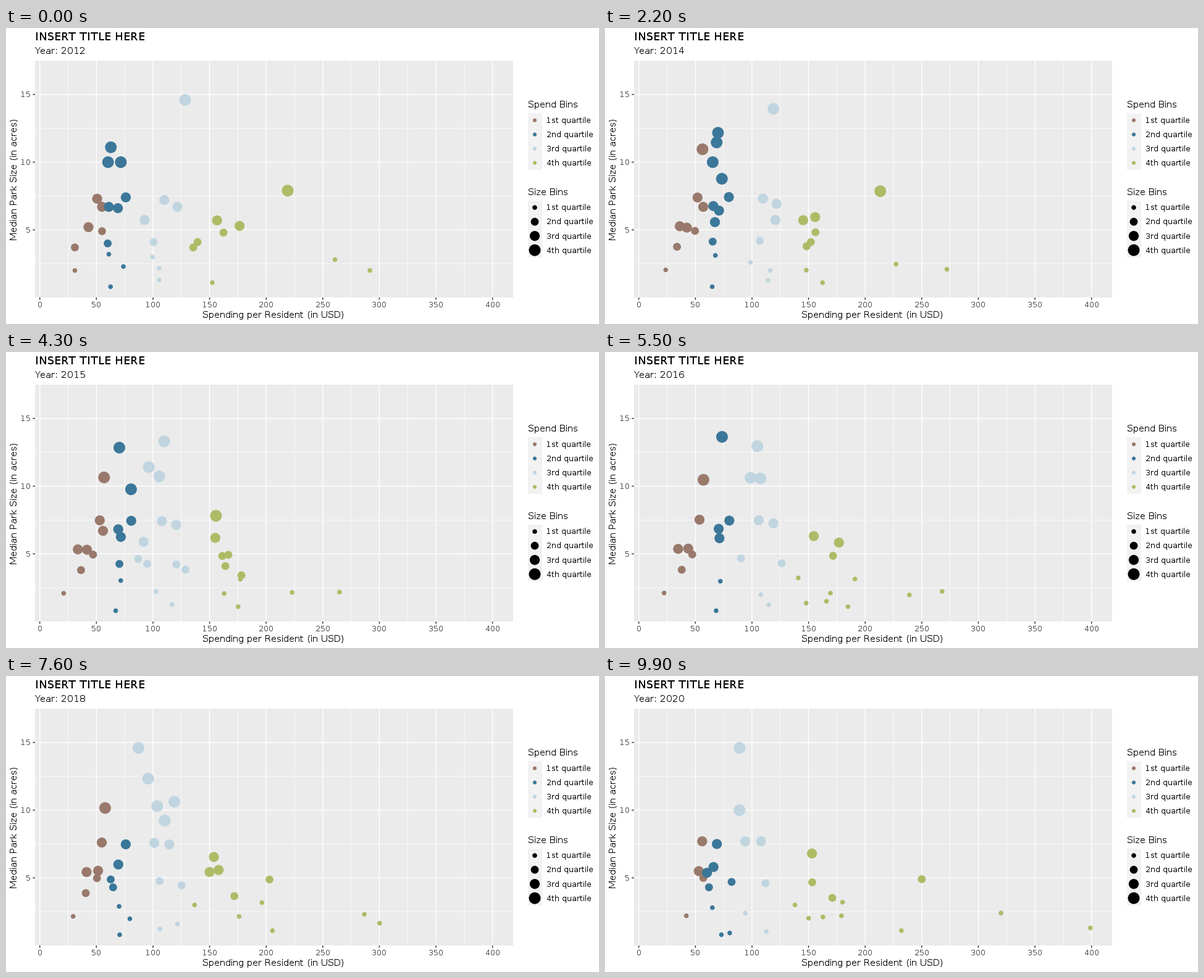
These frames come from a looping animation (960x480 px, 10 s). A matplotlib script:

```python
import math
import numpy as np
import matplotlib.pyplot as plt
from matplotlib.animation import FuncAnimation
from matplotlib.patches import Rectangle

# whole-pixel glyph advances
plt.rcParams.update({"font.family": "DejaVu Sans",
                     "text.hinting": "default", "text.hinting_factor": 1})

W, H, DPI = 960, 480, 96
FRAMES, INTERVAL = 100, 100
LAST_YEAR = 8
LEFT, RIGHT, TOP, BOTTOM = 47, 821, 53, 437
X_MIN, X_MAX, Y_MIN, Y_MAX = -4.2, 418.2, 0.005, 17.495

COLORS = ["#99796b", "#3b7799", "#c0d5e0", "#aebb66"]
QUARTILES = ["1st quartile", "2nd quartile", "3rd quartile", "4th quartile"]
SPEND_CUTS = [56.5, 85, 131.5]
SIZE_CUTS = [3.25, 5.05, 7.75]
LAYERS = [3, 2, 0, 1]


def px(x):
    return LEFT + (x - X_MIN) * (RIGHT - LEFT) / (X_MAX - X_MIN)


def py(y):
    return BOTTOM - (y - Y_MIN) * (BOTTOM - TOP) / (Y_MAX - Y_MIN)


def dot_radius(size):
    """Point size in mm to pixels, outline included."""
    return size * 72.27 / 25.4 * 0.5 + 0.945


def area(radius):
    return (2 * np.asarray(radius) * 72 / DPI) ** 2


# areas grow evenly from size 2 to size 6
RADII = [dot_radius(math.sqrt(a)) for a in np.linspace(4, 36, 4)]


class Dot:
    """Glides between two points; bow bends the way sideways."""

    def __init__(self, start, end, bow=0, years=(0, LAST_YEAR)):
        self.start, self.end = np.array(start, float), np.array(end, float)
        self.bow = bow
        self.born, self.gone = (round((FRAMES - 1) * k / LAST_YEAR) for k in years)
        self.spend = np.digitize(start[0], SPEND_CUTS)
        self.size = np.digitize(start[1], SIZE_CUTS)

    def at(self, i):
        u = (i - self.born) / max(1, self.gone - self.born)
        x, y = self.start + (self.end - self.start) * u
        return px(x + self.bow * math.sin(math.pi * u)), py(y)


dots = [
    # lowest spending
    Dot((31, 2), (42, 2.2), -15),
    Dot((55, 4.9), (57, 5), -9),
    Dot((43, 5.2), (53, 5.5), -14),
    Dot((50.7, 7.3), (56, 7.7)),
    Dot((31, 3.7), (42, 3.9), years=(0, 7)),
    Dot((55, 6.7), (55, 6.7), 2, (0, 4)),
    Dot((44, 5.1), (57, 5.6), -8, (1, 7)),
    Dot((56, 11.1), (58, 10), years=(1, 7)),
    # second quartile
    Dot((61, 3.2), (65, 2.8), 9),
    Dot((62.5, 0.8), (73, 0.8)),
    Dot((69, 6.6), (66, 5.8), 4),
    Dot((76, 7.4), (69, 7.5), 8),
    Dot((60, 4), (72, 4.3), years=(0, 4)),
    Dot((61, 6.7), (72, 6.9), 2, (0, 6)),
    Dot((60.3, 10), (66, 10), years=(0, 2)),
    Dot((71.6, 10), (81, 14.9), -7, (0, 6)),
    Dot((62.8, 11.1), (62, 12.9), 8, (0, 3)),
    Dot((70, 8.3), (83, 10.1), years=(1, 4)),
    Dot((65, 4.3), (62, 4.3), years=(6, 8)),
    Dot((61, 4.9), (82, 4.7), years=(6, 8)),
    # third quartile
    Dot((110, 7.2), (94, 7.7), 5),
    Dot((121.5, 6.7), (108, 7.7), 5),
    Dot((99.5, 3), (130, 1.4), -12, (0, 7)),
    Dot((105.6, 1.3), (100, 1.2), 14, (0, 7)),
    Dot((128.4, 14.6), (91, 12), years=(0, 7)),
    Dot((100.6, 4.1), (88, 4.3), 12, (0, 4)),
    Dot((107, 4.1), (112, 4.6), 18, (2, 8)),
    Dot((86, 4.6), (118, 4.8), -8, (3, 7)),
    Dot((97, 12.6), (119, 8.5), -9, (2, 7)),
    Dot((104, 10.8), (89, 10), 10, (3, 8)),
    Dot((110, 9.5), (126, 11.5), years=(5, 7)),
    Dot((87, 14.6), (89, 14.6), years=(6, 8)),
    # highest spending
    Dot((291.6, 2), (320, 2.4), -40),
    Dot((260.8, 2.8), (399, 1.3), -100),
    Dot((152.4, 1.1), (232, 1.1), -12),
    Dot((162.3, 4.8), (250, 4.9), -40),
    Dot((156.6, 5.7), (153, 6.8)),
    Dot((140, 2), (179, 2.2), 10, (1, 8)),
    Dot((147, 3.1), (180, 3.2), 32, (2, 8)),
    Dot((136, 3), (138, 3), years=(5, 8)),
    Dot((135.6, 3.7), (150, 3.8), years=(0, 2)),
    Dot((139.4, 4.1), (168, 4.1), years=(0, 4)),
    Dot((219, 7.9), (128, 7.8), 35, (0, 4)),
]

# a few dots stay for one year only
rng = np.random.default_rng(12)
for k in range(LAST_YEAR + 1):
    for _ in range(4):
        spot = np.array([rng.uniform(60, 190), rng.uniform(1, 6)])
        dots.append(Dot(spot, spot + rng.normal(0, (5, 0.2)),
                        years=(k, min(k + 1, LAST_YEAR))))

dots.sort(key=lambda d: LAYERS.index(d.spend))

fig = plt.figure(figsize=(W / DPI, H / DPI), dpi=DPI, facecolor="white")
ax = fig.add_axes([0, 0, 1, 1])
ax.set(xlim=(0, W), ylim=(H, 0))
ax.axis("off")


def label(x, y, text, pt=11.0, color="black", **kw):
    return ax.text(x, y, text, fontsize=pt, color=color, va="baseline", **kw)


def line(xs, ys, width, color="white"):
    ax.plot(xs, ys, color=color, lw=width * 72 / DPI, zorder=1,
            solid_capstyle="butt", snap=False)


def box(x, y, w, h, color):
    ax.add_patch(Rectangle((x, y), w, h, fc=color, lw=0, zorder=0))


box(LEFT, TOP, RIGHT - LEFT, BOTTOM - TOP, "#ebebeb")
for v in range(25, 400, 50):
    line([px(v)] * 2, [TOP, BOTTOM], 0.71)
for v in (2.5, 7.5, 12.5):
    line([LEFT, RIGHT], [py(v)] * 2, 0.71)
for v in range(0, 401, 50):
    line([px(v)] * 2, [TOP, BOTTOM], 1.42)
    line([px(v)] * 2, [BOTTOM, BOTTOM + 3.67], 1.42, "#333333")
    label(px(v), 453, str(v), 8.8, "#4d4d4d", ha="center")
for v in (5, 10, 15):
    line([LEFT, RIGHT], [py(v)] * 2, 1.42)
    line([LEFT - 3.67, LEFT], [py(v)] * 2, 1.42, "#333333")
    label(40.4, py(v) + 4.3, str(v), 8.8, "#4d4d4d", ha="right")

label(47, 20, "INSERT TITLE HERE", 13.2)
year = label(47, 42, "Year: 2012")
label(433.5, 470, "Spending per Resident (in USD)", ha="center")
label(18.3, 244.5, "Median Park Size (in acres)", ha="center",
      rotation=90, rotation_mode="anchor")


def legend(title, top, colors, radii):
    key = 23.04
    label(845, top - 9, title)
    box(845, top, key, 4 * key, "#f2f2f2")
    ys = top + key * (np.arange(4) + 0.5)
    ax.scatter([856] * 4, ys, s=area(radii), c=colors, lw=0, zorder=3, snap=False)
    for y, name in zip(ys, QUARTILES):
        label(875, y + 4.3, name, 8.8)


legend("Spend Bins", 138.1, COLORS, [dot_radius(1.5)] * 4)
legend("Size Bins", 279.6, ["black"] * 4, RADII)

cloud = ax.scatter([], [], lw=0, zorder=2, snap=False)


def update(i):
    live = [d for d in dots if d.born <= i <= d.gone]
    cloud.set_offsets([d.at(i) for d in live])
    cloud.set_sizes(area([RADII[d.size] for d in live]))
    cloud.set_facecolor([COLORS[d.spend] for d in live])
    year.set_text(f"Year: {round(2012 + LAST_YEAR * i / (FRAMES - 1))}")
    return cloud, year


anim = FuncAnimation(fig, update, frames=FRAMES, interval=INTERVAL,
                     init_func=lambda: update(0), repeat=True, repeat_delay=0)
plt.show()
```
